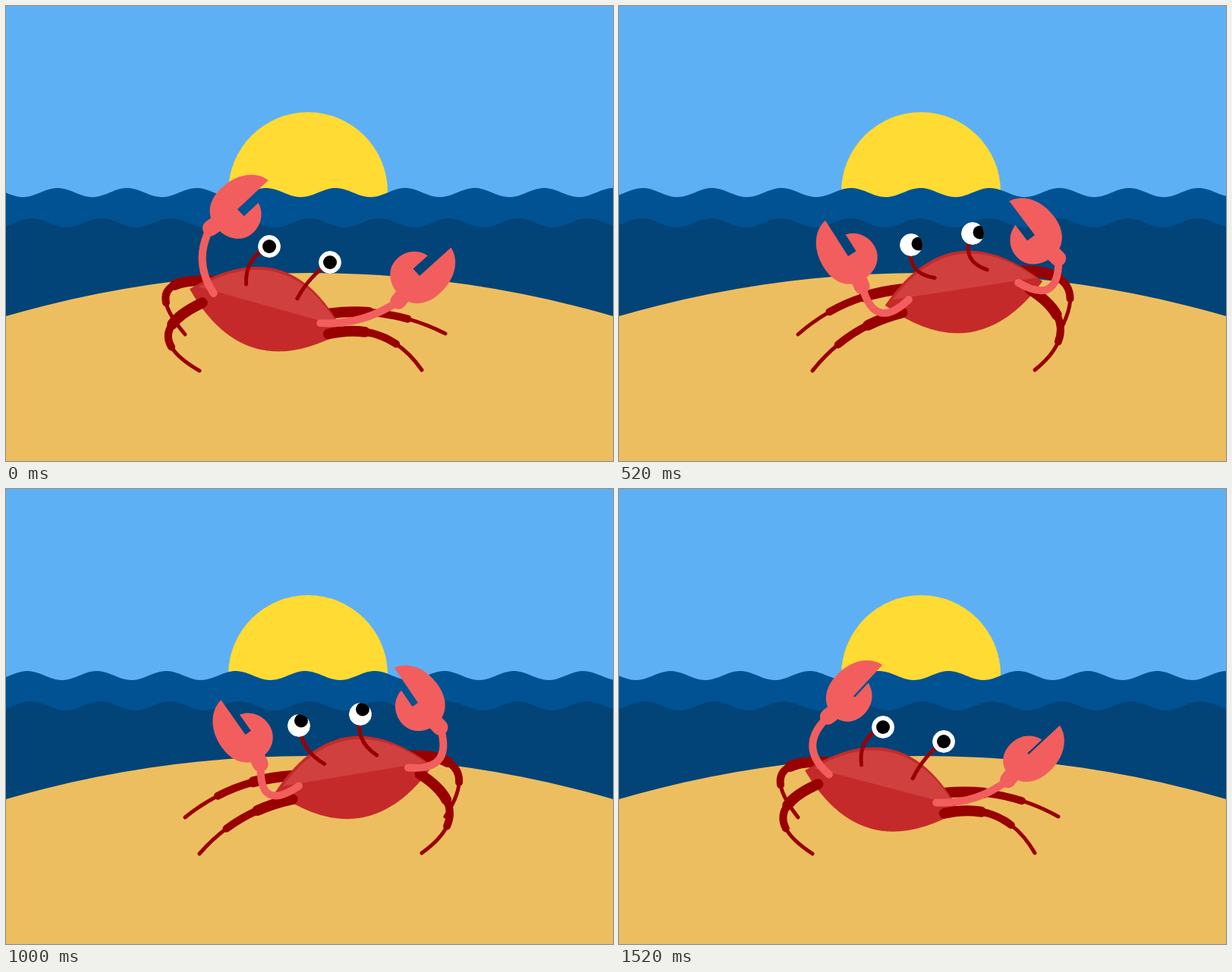
An HTML page that plays this animation: 800 by 600 pixels, repeating every 1.56 s.

```html
<!DOCTYPE html>
<html lang="en">
<head>
<meta charset="utf-8">
<title>Crab on the beach</title>
<style>
html, body { margin: 0; width: 100%; height: 100%; overflow: hidden; }
svg { display: block; width: 100vw; height: 100vh; }
.leg path { fill: none; stroke: #990000; stroke-linecap: round; }
.stalk { fill: none; stroke: #990000; stroke-width: 5; stroke-linecap: round; }
.arm { fill: none; stroke: #f25e5e; stroke-width: 10; stroke-linecap: round; }
</style>
</head>
<body>
<svg viewBox="0 0 800 600">
  <defs><clipPath id="lid"><circle r="15"/></clipPath></defs>
  <rect width="800" height="600" fill="#5eb0f5"/>
  <circle cx="398" cy="245" r="105" fill="#ffdb33"/>
  <path id="seaFar" fill="#005292"/>
  <path id="seaNear" fill="#024478"/>
  <circle cx="400" cy="1784" r="1432" fill="#edbe60"/>
  <g id="backLegs"></g>
  <g id="body">
    <path fill="#c52a2a" d="M-105 3Q0-109 105 3Q0 107-105 3Z"/>
    <path fill="#d0403e" d="M-94-3Q0-95 97-3Z"/>
  </g>
  <g id="stalks"></g>
  <g id="frontLegs"></g>
  <g id="claws"></g>
  <g id="eyes"></g>
</svg>
<script>
const LOOP = 1560, STEP = 40;
const $ = id => document.getElementById(id);

function add(parent, tag, attrs = {}) {
  const el = document.createElementNS('http://www.w3.org/2000/svg', tag);
  set(el, attrs);
  return parent.appendChild(el);
}
function set(el, attrs) {
  for (const k in attrs) el.setAttribute(k, attrs[k]);
}

// Smooth periodic track through keys, without overshoot.
function track(times, vals) {
  const n = times.length;
  const at = i => vals[(i + n) % n];
  const span = i => {
    const k = (i + n) % n;
    return (k === n - 1 ? LOOP : times[k + 1]) - times[k];
  };
  const slope = i => (at(i + 1) - at(i)) / span(i);
  const tangent = i => {
    const a = slope(i - 1), b = slope(i);
    return a * b <= 0 ? 0 : 2 * a * b / (a + b);
  };
  return t => {
    let i = n - 1;
    while (times[i] > t) i--;
    const d = span(i), u = (t - times[i]) / d, v = 1 - u;
    return v * v * (1 + 2 * u) * at(i) + u * u * (3 - 2 * u) * at(i + 1)
      + d * u * v * (v * tangent(i) - u * tangent(i + 1));
  };
}

const bodyTimes = [0, 240, 400, 520, 680, 1000, 1160, 1520];
const times = bodyTimes.filter(t => t !== 400);
const key = (...vals) => track(times, vals);

const bodyX = track(bodyTimes, [344, 356, 404, 454, 471.5, 458, 423, 347.5]);
const bodyY = track(bodyTimes, [398.5, 385, 345, 376, 397.5, 379.5, 350, 395]);
const bodyA = track(bodyTimes, [15.6, 12.2, 1, -8.7, -13.6, -9.5, -1.5, 14.7]);
const farX = key(68, 64, 31, 26, 28, 41, 68);
const nearX = key(34, 49, 30, 25, 33, 49, 34);
const lookX = key(0, 8, 9.5, 8.5, 3, 2, 0);
const lookY = key(0, 2, -1.5, -3, -6.5, -6, 0);
const gap = key(12.7, 2, 12.5, 9.6, 9, 9.6, 2.5);

// Eye and claw places are measured from the body centre.
const eyes = [
  { x: key(3, -10, -69, -78.5, -72, -56, 0.5),
    y: key(-81.5, -75, -61, -65.5, -67.5, -53, -81), root: -35 },
  { x: key(83, 72, 12, 1.5, 9, 27, 80.5),
    y: key(-60.5, -60, -76, -86.5, -82.5, -57, -62), root: 35 }
];
const claws = [
  { side: -1,
    x: key(-39, -59, -152, -147.5, -142.5, -151, -38.5),
    y: key(-130.5, -105.5, -46, -66.5, -55.5, -43, -122),
    a: key(47, 25, -32.5, -37, -35, -26, 43) },
  { side: 1,
    x: key(201, 180, 94, 80.5, 85, 94, 192.5),
    y: key(-42.5, -45, -74, -112.5, -97.5, -53, -45),
    a: key(48, 22.5, -37, -33, -34, -35.5, 47) }
];
const legs = [
  { side: -1, hip: [-80, -15], foot: [236, 433], layer: 'backLegs' },
  { side: 1, hip: [80, -15], foot: [579, 432], layer: 'backLegs' },
  { side: -1, hip: [-84, 16], foot: [255, 481], layer: 'frontLegs' },
  { side: 1, hip: [87, 11], foot: [548, 480], layer: 'frontLegs' }
];

for (const leg of legs) {
  const g = add($(leg.layer), 'g', { class: 'leg' });
  leg.parts = [14, 10, 5].map(w => add(g, 'path', { 'stroke-width': w }));
}
for (const eye of eyes) {
  eye.stalk = add($('stalks'), 'path', { class: 'stalk' });
  eye.g = add($('eyes'), 'g', { 'clip-path': 'url(#lid)' });
  add(eye.g, 'circle', { r: 15, fill: '#fff' });
  eye.pupil = add(eye.g, 'circle', { r: 9 });
}
for (const claw of claws) {
  claw.arm = add($('claws'), 'path', { class: 'arm' });
  claw.g = add($('claws'), 'g', { fill: '#f25e5e' });
  add(claw.g, 'path', { d: 'M-4 30L-6 43', stroke: '#f25e5e',
    'stroke-width': 21, 'stroke-linecap': 'round' });
  claw.hand = add(claw.g, 'path');
}

function turn([x, y], deg) {
  const r = deg * Math.PI / 180, c = Math.cos(r), s = Math.sin(r);
  return [x * c - y * s, x * s + y * c];
}
const plus = (p, q) => [p[0] + q[0], p[1] + q[1]];
const fmt = p => p[0].toFixed(2) + ' ' + p[1].toFixed(2);
const quad = (a, c, b) => `M${fmt(a)}Q${fmt(c)} ${fmt(b)}`;

// Control point of a limb that bows out more the closer its ends are.
function bow(a, b, side, reach, k, least) {
  const dx = b[0] - a[0], dy = b[1] - a[1], len = Math.hypot(dx, dy);
  const h = Math.sqrt(Math.max(least * least, reach - k * len * len));
  return [(a[0] + b[0]) / 2 - side * dy / len * h,
          (a[1] + b[1]) / 2 + side * dx / len * h];
}

// Part of a quadratic curve between two parameters.
function slice(a, c, b, u, v) {
  const pt = (s, t) => [0, 1].map(i =>
    (1 - s) * (1 - t) * a[i] + (s + t - 2 * s * t) * c[i] + s * t * b[i]);
  return quad(pt(u, u), pt(u, v), pt(v, v));
}

function wave(crest, mid) {
  let d = 'M0 600';
  for (let x = 0; x <= 800; x += 4) {
    const y = mid - 6 * Math.cos(2 * Math.PI * (x - crest) / 91.6);
    d += `L${x} ${y.toFixed(2)}`;
  }
  return d + 'L800 600Z';
}

function handPath(g) {
  return `M0-56C-22-52-35-30-35-4C-35 22-20 37 0 37`
    + `C${14 + g * 0.6} 37 ${24 + g} 24 ${24 + g} 6`
    + `C${24 + g}-9 ${15 + g}-22 ${g}-26L${g} 0L0 0Z`;
}

function draw(t) {
  const centre = [bodyX(t), bodyY(t)], tilt = bodyA(t);
  const onBody = p => plus(centre, turn(p, tilt));

  set($('seaFar'), { d: wave(farX(t), 246) });
  set($('seaNear'), { d: wave(nearX(t), 286) });
  set($('body'), { transform: `translate(${fmt(centre)}) rotate(${tilt})` });

  for (const { side, hip, foot, parts } of legs) {
    const a = onBody(hip);
    const c = bow(a, foot, -side, 12100, 0.58, 24);
    parts.forEach((el, i) =>
      set(el, { d: slice(a, c, foot, i / 3, (i + 1) / 3) }));
  }

  for (const eye of eyes) {
    const root = onBody([eye.root, -23]);
    const pos = plus(centre, [eye.x(t), eye.y(t)]);
    set(eye.stalk, { d: quad(root, bow(root, pos, -1, 2450, 0.6, 8), pos) });
    set(eye.g, { transform: `translate(${fmt(pos)})` });
    set(eye.pupil, { cx: lookX(t), cy: lookY(t) });
  }

  const hand = handPath(gap(t));
  for (const claw of claws) {
    const { side } = claw, a = claw.a(t);
    const pos = plus(centre, [claw.x(t), claw.y(t)]);
    const wrist = plus(pos, turn([6 * side, 44], a));
    const root = onBody([73 * side, 0]);
    set(claw.arm, { d: quad(root, bow(root, wrist, side, 5480, 0.666, 18), wrist) });
    set(claw.g, {
      transform: `translate(${fmt(pos)}) rotate(${a}) scale(${-side} 1)`
    });
    set(claw.hand, { d: hand });
  }
}

// The legs bow outwards: mirror the sign once for the curve helper.
for (const leg of legs) {
  const [hx, hy] = leg.hip;
  const outward = bow([400 + hx, 380 + hy], leg.foot, -leg.side, 12100, 0.58, 24);
  const mid = (400 + hx + leg.foot[0]) / 2;
  if ((outward[0] - mid) * leg.side < 0) leg.side = -leg.side;
}

const start = performance.now();
function tick() {
  const t = (performance.now() - start) % LOOP;
  draw(Math.floor(t / STEP) * STEP);
  requestAnimationFrame(tick);
}
draw(0);
requestAnimationFrame(tick);
</script>
</body>
</html>
```
